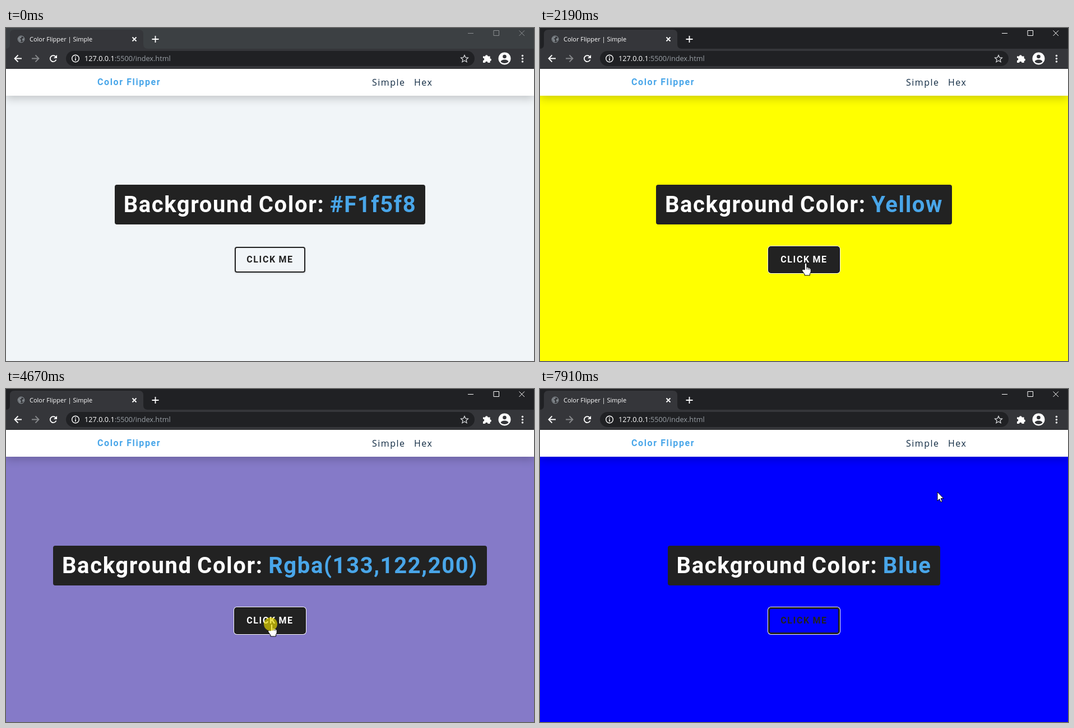
Recreate the animation shown at these times as an HTML page. Size 942 by 595 pixels, loop 8000 ms.

```html
<!DOCTYPE html>
<html lang="en">
<head>
<meta charset="utf-8">
<title>Color Flipper | Simple</title>
<style>
  html, body { margin: 0; width: 100%; height: 100%; overflow: hidden; }
  #stage { position: relative; width: 942px; height: 595px; overflow: hidden; }
  svg { position: absolute; left: 0; top: 0; display: block; }
  #top { box-shadow: 0 5px 15px rgba(0, 0, 0, .2); }
  main { position: absolute; top: 280px; width: 942px; display: flex; flex-direction: column; align-items: center; }
  h2, #btn { font-family: Roboto, sans-serif; font-weight: 700; letter-spacing: 1.6px; word-spacing: -.05em; white-space: pre; border-radius: 4px; }
  h2 { margin: 0 0 40px; padding: 16px 16px 15px; font-size: 40px; line-height: 40px; color: #fff; background: #222; }
  h2 span { color: #49a6e9; }
  #btn { width: 122px; text-align: center; border: 2px solid #222; font-size: 16px; line-height: 42px; }
  .ui { font-family: "Open Sans", sans-serif; font-weight: 500; }
  .logo { font: 700 16px Roboto, sans-serif; letter-spacing: 1.6px; }
  .link { font: 500 16px "Open Sans", sans-serif; letter-spacing: 1.5px; }
  .line { fill: none; stroke: #fff; stroke-width: 1.8; }
</style>
</head>
<body>
<div id="stage">
  <svg id="top" width="942" height="121">
    <rect id="frame" width="942" height="38"/>
    <path fill="#35363a" d="M0 37Q7 37 7 29V11Q7 3 15 3H237Q245 3 245 11V29Q245 37 253 37H942V73H0Z"/>
    <rect y="72" width="942" height="1" fill="#28292c"/>
    <rect y="73" width="942" height="48" fill="#fff"/>
    <rect x="107" y="41" width="729" height="27" rx="13.5" fill="#202124"/>

    <circle cx="27" cy="20" r="5.8" fill="none" stroke="#80868b" stroke-width="1.2"/>
    <path fill="#80868b" d="M22 18Q24 15 28 15L27 18 24 19 27 21 26 25Q22 24 22 18ZM29 19L32 18V22L29 23Z"/>
    <text class="ui" x="42" y="24" font-size="11" fill="#fff">Color Flipper | Simple</text>
    <path class="line" d="M225.5 16.5l7 7m0-7l-7 7"/>
    <path class="line" d="M260.5 20h12M266.5 14v12"/>
    <path id="controls" fill="none" d="M824 9.5h10M870 4.5h9.5v9h-9.5zM915.5 4.5l9.5 9.5m0-9.5l-9.5 9.5"/>

    <path class="line" d="M28 54.5H15.5m6-6l-6 6 6 6"/>
    <path class="line" style="stroke:#85878a" d="M46 54.5h12.5m-6-6l6 6-6 6"/>
    <path class="line" d="M88.5 51A5.5 5.5 0 1 0 89.5 56.5"/>
    <path fill="#fff" d="M91 48v6h-6z"/>
    <circle class="line" style="stroke-width:1.4" cx="124" cy="54.5" r="6.3"/>
    <path class="line" style="stroke-width:1.6" d="M124 50.8v1.6m0 1.4v4.5"/>
    <text class="ui" x="140" y="59" font-size="12.7" fill="#fff">127.0.0.1<tspan fill="#9aa0a6">:5500/index.html</tspan></text>
    <path class="line" style="stroke:#d4d6d9;stroke-width:1.3" d="M818 48.5l1.9 4.2 4.5.5-3.4 3 1 4.5-4-2.4-4 2.4 1-4.5-3.4-3 4.5-.5z"/>
    <path fill="#fff" d="M851 50.5h4a2.3 2.3 0 0 1 4.6 0h4v4a2.3 2.3 0 0 1 0 4.6v3h-4a2.3 2.3 0 0 0-4.6 0h-4v-4a2.3 2.3 0 0 0 0-4.6z"/>
    <circle cx="889.5" cy="54.5" r="11" fill="#fff"/>
    <circle cx="889.5" cy="51" r="3.3" fill="#35363a"/>
    <path fill="#35363a" d="M882.5 60Q884 56.5 889.5 56.5T896.5 60Q894 63 889.5 63T882.5 60Z"/>
    <g fill="#fff"><circle cx="921.5" cy="49.5" r="1.7"/><circle cx="921.5" cy="54.8" r="1.7"/><circle cx="921.5" cy="60" r="1.7"/></g>

    <text class="logo" x="163" y="102" fill="#49a6e9">Color Flipper</text>
    <text class="link" x="653" y="103" fill="#102a42">Simple</text>
    <text class="link" x="728" y="103" fill="#102a42">Hex</text>
  </svg>

  <main>
    <h2>Background Color: <span id="name"></span></h2>
    <div id="btn">CLICK ME</div>
  </main>

  <svg width="942" height="595">
    <g id="cursor" fill="#fff" stroke="#000">
      <g id="hand">
        <path d="M-1.8 12V1.8A1.8 1.8 0 0 1 1.8 1.8V7.5Q3.6 6.4 4.5 8.3 6.3 7.3 7 9.3 9.3 9 9.3 11V15Q9.3 17 7.5 19V22H-2V20L-6.3 13.8Q-6.8 11 -4.3 11.2Z"/>
        <path fill="none" stroke-width=".8" d="M1.8 7.5v4M4.5 8.3v3.5M7 9.3v3"/>
      </g>
      <path id="arrow" d="M0 0V16L3.7 12.6 6 18 8.5 17 6.2 11.6H11Z"/>
    </g>
    <circle id="press" cx="472" cy="420" r="12" fill="#e6d700" fill-opacity=".68"/>
  </svg>
</div>
<script>
const LOOP = 8000, ENTER = 840, HOVER = 1404, ACTIVE = 2030, LEAVE = 7210, UNHOVER = 7366;
const REST = [474, 420];
const flips = [
  [0, "#F1f5f8"], [2190, "Yellow"], [4510, "Rgba(133,122,200)"], [5980, "Green"], [6980, "Blue"]
];
const presses = [[2030, 2190], [3350, 4510], [4670, 5980], [6050, 6980]];

const $ = id => document.getElementById(id);
const clamp = v => Math.max(0, Math.min(1, v));
const mix = (a, b, p) => a + (b - a) * p;
const show = (id, on) => $(id).style.display = on ? "" : "none";

const step = (t, start, count, length) =>
  start + Math.min(count - 1, Math.floor((t - start) / length + 1e-6)) * length;

function sampled(t) {
  if (t >= LEAVE) return step(t, LEAVE, 10, 700 / 9);
  if (t >= 1770) return t;
  if (t >= 1690) return 1690;
  return t >= ENTER ? step(t, ENTER, 11, 78) : t;
}

function cursorAt(t) {
  if (t >= LEAVE) {
    const p = clamp((t - LEAVE + 78) / 778), e = p * p * (3 - 2 * p);
    return [mix(REST[0], 709, e), mix(REST[1], 184, e)];
  }
  if (t >= 1690) return REST;
  const e = 1 - (1 - clamp((t - ENTER) / 780)) ** 2;
  return [mix(790, 476, e), mix(586, 423, e)];
}

function render(time) {
  const t = sampled(time), active = t >= ACTIVE;
  const [, color] = flips.findLast(f => t >= f[0]);
  $("stage").style.background = color;
  if ($("name").textContent !== color) $("name").textContent = color;

  $("frame").setAttribute("fill", active ? "#202124" : "#3c4043");
  $("controls").setAttribute("stroke", active ? "#fff" : "#8b8e91");

  const hover = clamp((t - HOVER) / 300) - clamp((t - UNHOVER) / 300);
  const ink = mix(34, 255, hover), btn = $("btn").style;
  btn.color = `rgb(${ink},${ink},${ink})`;
  btn.backgroundColor = `rgba(34,34,34,${hover})`;
  btn.boxShadow = (active ? "0 0 0 1px #101010, 0 0 0 2px #fff, " : "") + "0 1px 3px rgba(0,0,0,.2)";

  const [x, y] = cursorAt(t), overButton = t >= HOVER - 20 && t < UNHOVER;
  $("cursor").setAttribute("transform", `translate(${x} ${y})`);
  show("cursor", t >= ENTER);
  show("hand", overButton);
  show("arrow", !overButton);
  show("press", presses.some(([from, to]) => t >= from && t < to));
}

function tick() {
  render(performance.now() % LOOP);
  requestAnimationFrame(tick);
}
tick();
</script>
</body>
</html>
```
